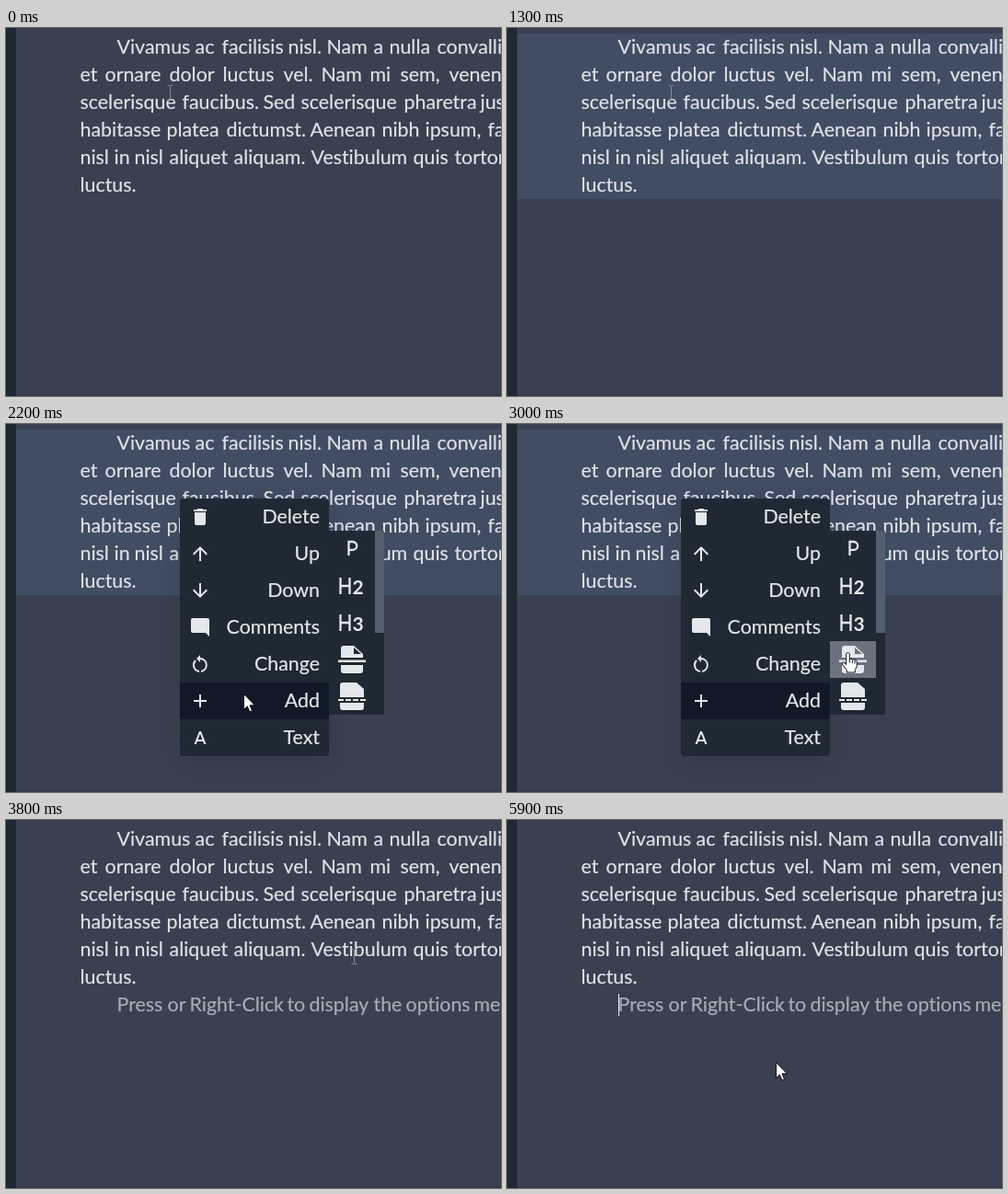
An HTML page for the animation above (6300 ms loop, 538x400 px).

```html
<!DOCTYPE html>
<html lang="en">
<head>
<meta charset="utf-8">
<title>Block editor menu</title>
<style>
  html, body { margin: 0; width: 100%; height: 100%; overflow: hidden; background: #3a404f; }
  #stage {
    position: absolute; left: 0; top: 0; width: 538px; height: 400px; overflow: hidden;
    background: #3a404f; color: #dfe2e7; font: 21.4px/30px Lato, "Open Sans", sans-serif;
    font-variant-ligatures: none; -webkit-text-stroke: .2px;
  }
  #stage div, #stage svg, .line span { position: absolute; }
  #side { left: 0; top: 0; width: 11px; height: 400px; background: #1f2933; }
  #foot { left: 11px; bottom: 0; width: 527px; height: 2px; background: #363a48; }
  #block { left: 11px; top: 6px; width: 527px; height: 180px; background: #414d63; }
  .line { left: -.5px; height: 30px; white-space: nowrap; }
  #hint { color: #a8acb5; }
  .caret { width: 1px; height: 24px; background: #eef0f3; }
  #menu {
    left: 189px; top: 81px; width: 162px; height: 280px; border-radius: 4px;
    background: #1f2933; box-shadow: 0 8px 24px rgba(20, 24, 36, .16); color: #e4e7eb;
  }
  .row { left: 0; width: 162px; height: 40px; }
  .row span { position: absolute; right: 10px; line-height: 38px; }
  .row svg { left: 10px; top: 8px; fill: #e4e7eb; }
  .row.on { background: #121926; }
  #sub { left: 351px; top: 116px; width: 60px; height: 200px; background: #1f2933; }
  #thumb { left: 50px; top: 0; width: 10px; height: 111px; background: #52606d; }
  #hover { left: 0; width: 50px; height: 40px; background: #6b727e; }
  #stage .cursor { left: 0; top: 0; overflow: visible; }
</style>
</head>
<body>
<div id="stage">
  <div id="side"></div>
  <div id="foot"></div>
  <div id="block"></div>
  <div id="text"></div>
  <div id="hint"></div>
  <div id="caret1" class="caret" style="left:175px;top:69px"></div>
  <div id="caret2" class="caret" style="left:121px;top:189px"></div>
  <div id="menu"></div>
  <div id="sub">
    <div id="hover"></div>
    <svg width="50" height="200" fill="#e4e7eb">
      <g fill="none" stroke="#e4e7eb" stroke-width="2.3">
        <path d="M21.5 27V12h4.3a4.4 4.4 0 0 1 0 8.8h-4.3"/>
        <path id="h" d="M12.5 51v18M22.5 51v18M12.5 60h10"/>
        <use href="#h" y="40"/>
      </g>
      <g font-size="21" font-weight="700">
        <text x="25.5" y="69">2</text>
        <text x="25.5" y="109">3</text>
      </g>
      <path d="M13 138v-10a3 3 0 0 1 3-3h11l10 9v4zM27 127v7h8z" fill-rule="evenodd"/>
      <path d="M10 140.5h30v2.5H10zM13 146h24v6a3 3 0 0 1-3 3H16a3 3 0 0 1-3-3z"/>
      <path d="M12 181v-13a3 3 0 0 1 3-3h15l8 7v9zM12 187h26v5a3 3 0 0 1-3 3H15a3 3 0 0 1-3-3z"/>
      <path d="M10 184h30" stroke="#e4e7eb" stroke-width="2" stroke-dasharray="6 2"/>
    </svg>
    <div id="thumb"></div>
  </div>
  <svg id="beam" class="cursor" width="1" height="1">
    <path d="M-3-8h2.5M.5-8H3M0-7.5v15M-3 8h2.5M.5 8H3" fill="none" stroke="#858890"/>
  </svg>
  <svg id="arrow" class="cursor" width="1" height="1">
    <path d="M-1-1v17l3.8-3.7 2.6 6 2.6-1.1-2.5-5.9h5.3z" fill="#fff" stroke="#10131a"/>
  </svg>
  <svg id="hand" class="cursor" width="1" height="1">
    <path d="M-1.8 0Q0-2 1.8 0v6q2-1 3 .5 2-.7 2.7.8 2.2-.4 2.3 1.7v5l-2 4v2.5h-9V18l-5-6.5q-.6-2.2 1.4-2.2l3 2.7z" fill="#fff" stroke="#10131a"/>
    <path d="M1.8 6v4M4.8 7v3.5M7.5 8v3" stroke="#10131a"/>
  </svg>
</div>
<script>
  const LOOP = 6300, STEP = 100;
  const $ = id => document.getElementById(id);

  // Each word follows its left edge, as the justified lines run past the stage.
  const lines = [
    "121 Vivamus 206 ac 235 facilisis 307 nisl. 349 Nam 400 a 417 nulla 469 convallis",
    "81 et 108 ornare 178 dolor 236 luctus 302 vel. 343 Nam 396 mi 429 sem, 482 venenatis",
    "81 scelerisque 192 faucibus. 280 Sed 321 scelerisque 433 pharetra 516 justo",
    "81 habitasse 175 platea 240 dictumst. 331 Aenean 409 nibh 456 ipsum, 524 facilisis",
    "81 nisl 118 in 140 nisl 178 aliquet 248 aliquam. 332 Vestibulum 443 quis 488 tortor",
    "81 luctus."
  ];
  const hint = "121 Press 176 or 200 Right-Click 306 to 330 display 400 the 435 options 509 menu";

  function addLine(parent, line, top) {
    const row = document.createElement("div");
    row.className = "line";
    row.style.top = top + "px";
    row.innerHTML = line.replace(/(\d+) (\S+)/g, '<span style="left:$1px">$2</span>');
    parent.append(row);
  }
  lines.forEach((line, i) => addLine($("text"), line, 5 + 30 * i));
  addLine($("hint"), hint, 185);

  const items = [
    ["Delete", "M6 19c0 1.1.9 2 2 2h8c1.1 0 2-.9 2-2V7H6zM19 4h-3.5l-1-1h-5l-1 1H5v2h14z"],
    ["Up", "M4 12l1.4 1.4L11 7.8V20h2V7.8l5.6 5.6L20 12l-8-8z"],
    ["Down", "M20 12l-1.4-1.4-5.6 5.6V4h-2v12.2l-5.6-5.6L4 12l8 8z"],
    ["Comments", "M22 4a2 2 0 0 0-2-2H4a2 2 0 0 0-2 2v12a2 2 0 0 0 2 2h14l4 4z"],
    ["Change", "M12 5V2L8 6l4 4V7a6 6 0 0 1 1 11.9v2A8 8 0 0 0 12 5zM6 13a6 6 0 0 1 1.8-4.2L6.3 7.3A8 8 0 0 0 11 20.9v-2A6 6 0 0 1 6 13z"],
    ["Add", "M19 13h-6v6h-2v-6H5v-2h6V5h2v6h6z"],
    ["Text", "M11 5L5.5 19h2.3l1.1-3h6.2l1.1 3h2.3L13 5zM9.6 14L12 7.7 14.4 14z"]
  ];
  $("menu").innerHTML = items.map(([name, icon], i) =>
    `<div class="row" style="top:${40 * i}px"><svg width="24" height="24"><path fill-rule="evenodd" d="${icon}"/></svg><span>${name}</span></div>`
  ).join("");
  const rows = [...document.querySelectorAll(".row")];
  rows[0].style.borderRadius = "4px 4px 0 0";
  rows[6].style.borderRadius = "0 0 4px 4px";

  // time, x, y of the pointer
  const path = [
    [0, 178, 70], [1300, 178, 70], [1500, 148, 146], [1700, 168, 225], [1900, 224, 282],
    [2200, 259, 294], [2500, 292, 301], [2700, 322, 300], [2900, 362, 284],
    [3100, 378, 214], [3300, 378, 154], [3500, 378, 148], [3800, 378, 148],
    [4000, 335, 186], [4200, 265, 244], [4300, 252, 252], [4400, 263, 257],
    [4500, 281, 261], [4600, 293, 264], [LOOP, 293, 264]
  ];

  function pointerAt(t) {
    const i = path.findIndex(p => p[0] > t);
    const [t0, x0, y0] = path[i - 1], [t1, x1, y1] = path[i];
    const k = (t - t0) / (t1 - t0);
    return [Math.round(x0 + (x1 - x0) * k), Math.round(y0 + (y1 - y0) * k)];
  }

  const within = (t, ...spans) => spans.some(([a, b]) => t >= a && t < b);
  const show = (id, on) => { $(id).style.visibility = on ? "visible" : "hidden"; };

  function render(t) {
    const [x, y] = pointerAt(t);
    const menu = within(t, [1400, 3800]), sub = within(t, [2100, 3800]);
    const overSub = sub && x >= 351 && x < 401 && y >= 116 && y < 316;
    const overMenu = menu && x >= 189 && x < 351 && y >= 81 && y < 361;
    const overText = !overMenu && y < (t < 3800 ? 186 : 216);

    show("block", within(t, [1300, 3800]));
    show("menu", menu);
    show("sub", sub);
    show("hint", t >= 3800);
    show("caret1", within(t, [400, 900], [1400, 1900], [2400, 2900], [3400, 3700]));
    show("caret2", within(t, [4800, 5300], [5900, LOOP]));

    const active = sub ? 5 : overMenu ? Math.floor((y - 81) / 40) : -1;
    rows.forEach((row, i) => row.classList.toggle("on", i === active));
    show("hover", overSub);
    $("hover").style.top = 40 * Math.floor((y - 116) / 40) + "px";

    const shape = overSub ? "hand" : overText ? "beam" : "arrow";
    for (const id of ["beam", "arrow", "hand"]) show(id, id === shape);
    $(shape).style.transform = `translate(${x + .5}px, ${y + .5}px)`;
  }

  const start = performance.now();
  function tick() {
    const t = (performance.now() - start) % LOOP;
    render(Math.floor(t / STEP) * STEP);
    requestAnimationFrame(tick);
  }
  tick();
</script>
</body>
</html>
```
